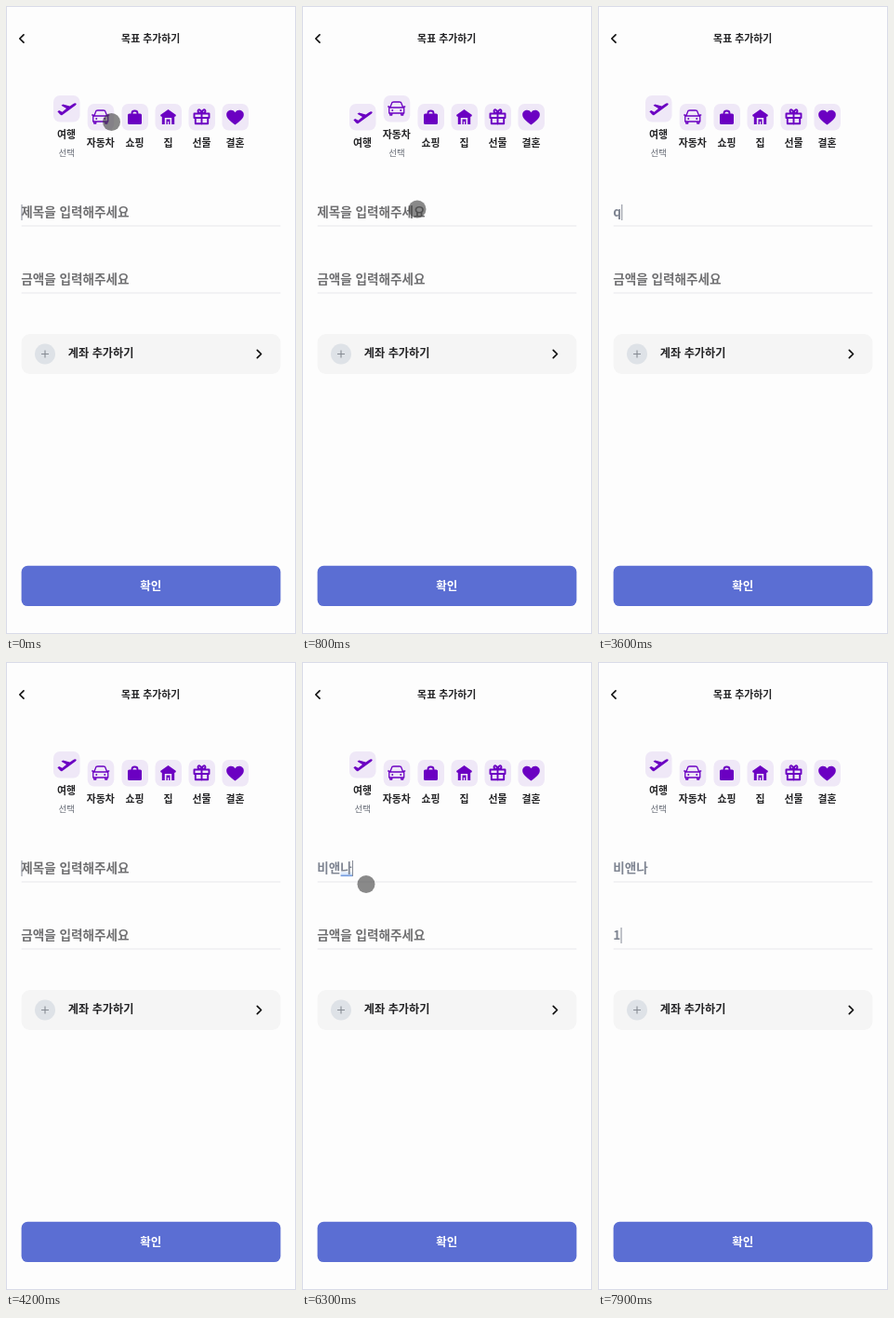
An HTML page that plays this animation: 312 px wide and 674 px high, repeating every 8000 ms.

```html
<!DOCTYPE html>
<html lang="ko">
<head>
<meta charset="utf-8">
<title>목표 추가하기</title>
<style>
html, body { margin: 0; width: 100%; height: 100%; overflow: hidden; background: #fdfdfd; }
svg { display: block; width: 312px; height: 674px; }
text { font-family: "Noto Sans CJK KR", "Noto Sans CJK", sans-serif; font-weight: 700; fill: #242426; }
.mid { text-anchor: middle; }
.line { fill: none; stroke: #6b00c2; stroke-width: 1.3; stroke-linejoin: round; stroke-linecap: round; }
.bold { stroke-width: 1.9; }
.fill { fill: #6b00c2; }
.tile { fill: #efe8f7; }
.chev { fill: none; stroke: #111; stroke-width: 1.7; stroke-linecap: round; stroke-linejoin: round; }
</style>
</head>
<body>
<svg viewBox="0 0 312 674">
  <rect x=".5" y=".5" width="311" height="673" fill="#fdfdfd" stroke="#d9dbe8"/>
  <path class="chev" d="M19 30.8L14.800 35l4.200 4.200"/>
  <text class="mid" x="155.700" y="38.600" font-size="10.900">목표 추가하기</text>
  <g id="tiles"></g>
  <path d="M16.600 236H295.400M16.600 308H295.400" stroke="#e8e8ec" stroke-width="1.200"/>
  <g id="fields"></g>
  <rect x="16.600" y="352" width="278.800" height="43" rx="9" fill="#f5f5f5"/>
  <circle cx="42" cy="373.500" r="11" fill="#dee2e7"/>
  <path d="M38 373.500h8M42 369.500v8" stroke="#868b93" stroke-width="1.100"/>
  <text x="66.800" y="377" font-size="12.200">계좌 추가하기</text>
  <path class="chev" d="M270.300 369.300l4.200 4.200-4.200 4.200"/>
  <rect x="16.600" y="600.700" width="278.800" height="43.400" rx="6.700" fill="#5b6ed3"/>
  <text class="mid" x="155.700" y="626.600" font-size="12.500" style="fill:#fff">확인</text>
  <circle id="cursor" r="9.500" fill="#3c3c3c" fill-opacity=".6"/>
</svg>
<script>
const LOOP = 8000, STEP = 100;
const $ = id => document.getElementById(id);

function add(parent, tag, attrs, text) {
  const el = document.createElementNS('http://www.w3.org/2000/svg', tag);
  for (const k in attrs) el.setAttribute(k, attrs[k]);
  if (text) el.textContent = text;
  parent.appendChild(el);
  return el;
}

// Icons are drawn in a 28 x 28 tile.
const icons = {
  여행: `<path class="fill" transform="rotate(-8 14 14)" d="M4 16l2-1 3 2 5-3-5-4 2-1 7 3 4-2q2-1 3 0t-1 2L9 20q-2 1-3-1z"/>`,
  자동차: `<path class="line" d="M7 13l2-5q0-1 2-1h6q2 0 2 1l2 5zM6 13h16v6H6zM7 19v2h2v-2M19 19v2h2v-2M5 12h1M22 12h1"/>
    <circle class="fill" cx="9.500" cy="16" r="1"/><circle class="fill" cx="18.500" cy="16" r="1"/>`,
  쇼핑: `<path class="line bold" d="M11 12v-2a3 2.500 0 0 1 6 0v2"/><rect class="fill" x="6.500" y="10.500" width="15" height="11.500" rx="1.600"/>`,
  집: `<path class="fill" d="M14 6l8.500 6-1 2-.8-.5V22h-3v-7h-7.400v7h-3v-8.500l-.8.5-1-2z"/><path class="fill" d="M12 16.500h4V22h-1.400v-3h-1.200v3H12z"/>`,
  선물: `<path class="line bold" d="M6 10.500h16v4.500H6zM7.300 15h13.400v6.300H7.300zM14 10.500v11M14 10c-2 0-4-.5-4-2 0-3 3.500-2 4 2 .5-4 4-5 4-2 0 1.500-2 2-4 2"/>`,
  결혼: `<path class="fill" d="M14 22.500C8 18 4.700 15.500 4.700 11.500c0-5 7-6.500 9.300-2.200 2.300-4.300 9.300-2.800 9.300 2.200 0 4-3.300 6.500-9.300 11z"/>`
};

// Columns sit in a row; a long label widens its column.
let left = 51;
const tiles = Object.keys(icons).map(name => {
  const width = name.length > 2 ? 30 : 28.5;
  const x = left + (width - 28.5) / 2;
  left += width + 7.5;
  const g = add($('tiles'), 'g', {});
  add(g, 'rect', { width: 28.5, height: 28.5, rx: 7, class: 'tile' });
  add(g, 'g', {}).innerHTML = icons[name];
  add(g, 'text', { class: 'mid', x: 14, y: 46, 'font-size': 10.9 }, name);
  const tag = add(g, 'text', { class: 'mid', x: 14.2, y: 65.3, 'font-size': 9.5, style: 'fill:#686d77;font-weight:400' }, '선택');
  return { g, x, tag };
});

function makeField(y, hint) {
  const g = $('fields');
  const mark = add(g, 'rect', { y: y + 5, height: 5, fill: '#dceafd' });
  const bar = add(g, 'rect', { y: y + 8, height: 1.4, fill: '#6f96dc' });
  const text = add(g, 'text', { x: 16.2, y: y + 5, 'font-size': 13.6 });
  const caret = add(g, 'rect', { y: y - 7.5, width: 1, height: 17, fill: '#858a96' });
  return (value, focused) => {
    text.textContent = value || hint;
    text.style.fill = value ? '#7f8592' : '#707072';
    const w = value ? text.getComputedTextLength() : 0;
    const from = value.length > 1 ? text.getSubStringLength(0, value.length - 1) : 0;
    // The Hangul syllable being composed is underlined.
    const composing = focused && /[ㄱ-힣]$/.test(value);
    for (const el of [mark, bar]) {
      el.setAttribute('x', 16.6 + from);
      el.setAttribute('width', composing ? w - from : 0);
    }
    caret.setAttribute('x', 16.5 + w);
    caret.style.display = focused ? '' : 'none';
  };
}
const showTitle = makeField(220.5, '제목을 입력해주세요');
const showAmount = makeField(292.5, '금액을 입력해주세요');

// Pointer glides: time, x, y; it is hidden between them.
const glides = [
  [[0, 113.5, 124.5], [200, 118, 120], [500, 286, 631], [700, 105, 130], [800, 124, 218], [1200, 128.5, 231.5], [1300, 126, 225.5], [3500, 126, 225.5]],
  [[6100, 125.5, 225.5], [6300, 69, 238.5], [6700, 25.5, 289.5], [7700, 25.5, 289.5]]
];
// Typing bursts: start, time per key, text after each key.
const bursts = [
  [3600, 200, ['q', 'qo', 'q', '']],
  [4600, 150, ['ㅂ', '비', '빙']],
  [5200, 130, ['비애', '비앤', '비앤ㄴ', '비앤나']]
];

function pointer(t) {
  const path = glides.find(g => t >= g[0][0] && t <= g[g.length - 1][0]);
  if (!path) return null;
  const i = Math.max(1, path.findIndex(p => p[0] >= t));
  const [t0, x0, y0] = path[i - 1], [t1, x1, y1] = path[i];
  const k = (t - t0) / (t1 - t0);
  return { x: x0 + (x1 - x0) * k, y: y0 + (y1 - y0) * k };
}

function typed(t) {
  const burst = bursts.filter(b => b[0] <= t).pop();
  if (!burst) return '';
  const [start, pace, keys] = burst;
  return keys[Math.min(keys.length - 1, Math.floor((t - start) / pace))];
}

// The tile under the pointer rises one step late; the first is the default.
function picked(t) {
  const p = pointer(t - STEP);
  if (!p || p.y < 96 || p.y > 165) return 0;
  return Math.max(0, tiles.findIndex(tile => p.x >= tile.x && p.x < tile.x + 36));
}

function draw(time) {
  const t = Math.floor(time / STEP) * STEP;
  const pick = picked(t);
  tiles.forEach((tile, i) => {
    tile.g.setAttribute('transform', `translate(${tile.x} ${i === pick ? 96 : 105})`);
    tile.tag.style.display = i === pick ? '' : 'none';
  });
  const p = pointer(t);
  $('cursor').style.display = p ? '' : 'none';
  if (p) $('cursor').setAttribute('transform', `translate(${p.x} ${p.y})`);
  showTitle(typed(t), t < 100 || t >= 1600 && t < 7000);
  showAmount(t >= 7900 ? '1' : '', t >= 7000);
}

const start = performance.now();
function tick(now) {
  draw(Math.max(0, now - start) % LOOP);
  requestAnimationFrame(tick);
}
draw(0);
requestAnimationFrame(tick);
</script>
</body>
</html>
```
